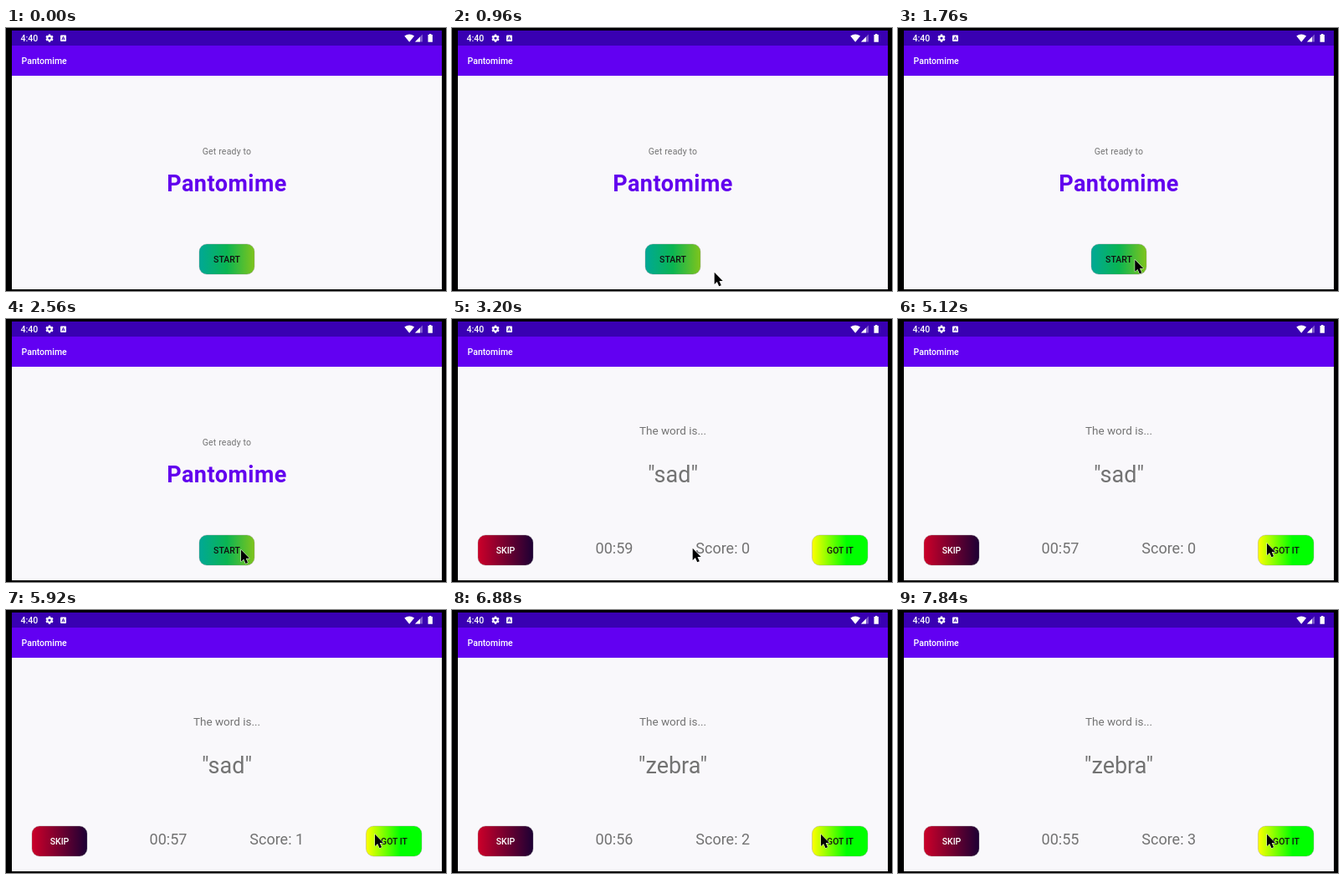
These frames come from a looping animation (526x314 px, 8 s). An HTML page:

```html
<!DOCTYPE html>
<html lang="en">
<head>
<meta charset="utf-8">
<title>Word game</title>
<style>
  html, body { margin: 0; width: 100%; height: 100%; overflow: hidden; background: #000; }
  svg { display: block; width: 526px; height: 314px; }
  text { font: 10.5px Roboto, Arial, sans-serif; fill: #737373; white-space: pre; }
  .mid { text-anchor: middle; }
  .med { font-weight: 500; }
  .light { fill: #fff; }
  .dark { fill: #111; }
  .spaced { letter-spacing: .0178em; }
  .info { font-size: 18px; }
  .big { font-size: 27px; }
  .brand { font-weight: 700; fill: #6200ee; }
  .edge { stroke: #8a8a8a; stroke-opacity: .5; stroke-width: .7; }
</style>
</head>
<body>
<svg viewBox="0 0 526 314">
  <defs>
    <linearGradient id="teal">
      <stop offset="0" stop-color="#00a896"/>
      <stop offset=".5" stop-color="#0ab552"/>
      <stop offset="1" stop-color="#7fc41c"/>
    </linearGradient>
    <linearGradient id="red">
      <stop offset="0" stop-color="#cc0029"/>
      <stop offset=".5" stop-color="#74002f"/>
      <stop offset="1" stop-color="#1c0034"/>
    </linearGradient>
    <linearGradient id="lime">
      <stop offset="0" stop-color="#ffff00"/>
      <stop offset=".62" stop-color="#00ff00"/>
      <stop offset="1" stop-color="#00ff00"/>
    </linearGradient>
  </defs>

  <rect width="526" height="314"/>
  <rect x="7" y="3" width="514" height="309" fill="#f9f8fb"/>
  <rect x="7" y="3" width="514" height="18.5" fill="#3900b2"/>
  <rect x="7" y="21" width="514" height="36" fill="#6200f2"/>

  <!-- status bar -->
  <text class="med light" x="17.5" y="16">4:40</text>
  <g transform="translate(52 12.2)">
    <g id="teeth" fill="#fff"></g>
    <circle r="2.6" fill="none" stroke="#fff" stroke-width="2.1"/>
  </g>
  <rect x="65" y="8.5" width="7" height="7.5" rx="1" fill="#fff"/>
  <path d="M66.8 14.4 68.5 10.2 70.2 14.4M67.4 13h2.2" fill="none" stroke="#3900b2" stroke-width=".9"/>
  <path d="M476.3 9.6Q482.2 5.4 488.1 9.6L482.2 16.8Z" fill="#fff"/>
  <path d="M498 7.6V16.6H489Z" fill="#fff" fill-opacity=".35"/>
  <path d="M495 10.6V16.6H489Z" fill="#fff"/>
  <path d="M506 7h2.4v1.1h1.5v8.7h-5.4V8.1H506Z" fill="#fff"/>
  <text class="med light" x="18.6" y="43">Pantomime</text>

  <g id="intro">
    <text class="mid spaced" x="264" y="151">Get ready to</text>
    <text class="mid spaced big brand" x="264" y="195">Pantomime</text>
    <rect class="edge" x="231" y="258" width="66" height="36" rx="9" fill="url(#teal)"/>
    <text class="mid med dark" x="264" y="280">START</text>
  </g>

  <g id="game">
    <text class="mid" x="264" y="138.4" style="font-size:13.5px">The word is...</text>
    <text class="mid big" id="word" x="264" y="195"></text>
    <text class="mid info" id="clock" x="194" y="280"></text>
    <text class="mid info" id="score" x="323.7" y="280"></text>
    <rect class="edge" x="31" y="258" width="66" height="36" rx="9" fill="url(#red)"/>
    <text class="mid med light" x="64" y="280">SKIP</text>
    <rect class="edge" x="430.5" y="258" width="66.5" height="36" rx="9" fill="url(#lime)"/>
    <text class="mid med dark" x="464" y="280">GOT IT</text>
  </g>

  <path id="cursor" d="M0 0V14.2L3.2 11.3 5.5 16.6 8.1 15.5 5.8 10.3H10Z"
        fill="#000" stroke="#fff" stroke-width="1" stroke-linejoin="round" paint-order="stroke"/>
</svg>
<script>
  const LOOP = 8000, STEP = 160, GAME_AT = 2880;
  const $ = id => document.getElementById(id);

  // [time, x, y] of the pointer tip
  const path = [
    [160, 374, 312], [480, 345, 305], [960, 313.7, 291.7], [1120, 300.5, 282.5],
    [1600, 284, 277], [2240, 281, 275.5], [2560, 281, 275.5], [2880, 284, 275],
    [3200, 287.7, 273.7], [3520, 292, 274], [3680, 292, 274], [4000, 360, 274],
    [4320, 428.5, 271.7], [4640, 441, 267.7]
  ];
  const words = [[0, "sad"], [6720, "zebra"]];
  const scores = [[0, 0], [5760, 1], [6720, 2], [7360, 3]];

  const latest = (table, t) => table.filter(row => row[0] <= t).pop()[1];

  function pointer(t) {
    const i = path.findIndex(row => row[0] > t);
    if (i < 0) return path[path.length - 1].slice(1);
    const [a, b] = [path[i - 1], path[i]];
    const k = (t - a[0]) / (b[0] - a[0]);
    return [1, 2].map(n => a[n] + (b[n] - a[n]) * k);
  }

  function draw(t) {
    const playing = t >= GAME_AT;
    $("intro").style.display = playing ? "none" : "";
    $("game").style.display = playing ? "" : "none";
    $("word").textContent = `"${latest(words, t)}"`;
    $("clock").textContent = "00:" + (59 - Math.max(0, Math.floor((t - 3000) / 1000)));
    $("score").textContent = "Score: " + latest(scores, t);

    const shown = t >= path[0][0];
    $("cursor").style.display = shown ? "" : "none";
    if (shown) $("cursor").setAttribute("transform", `translate(${pointer(t)})`);
  }

  $("teeth").innerHTML = [0, 60, 120].map(a =>
    `<path d="M-1.2-4.6H1.2V-2.6H-1.2ZM-1.2 2.6H1.2V4.6H-1.2Z" transform="rotate(${a})"/>`).join("");

  const start = performance.now();
  function tick() {
    const t = (performance.now() - start) % LOOP;
    draw(Math.floor(t / STEP) * STEP);
    requestAnimationFrame(tick);
  }
  draw(0);
  requestAnimationFrame(tick);
</script>
</body>
</html>
```
